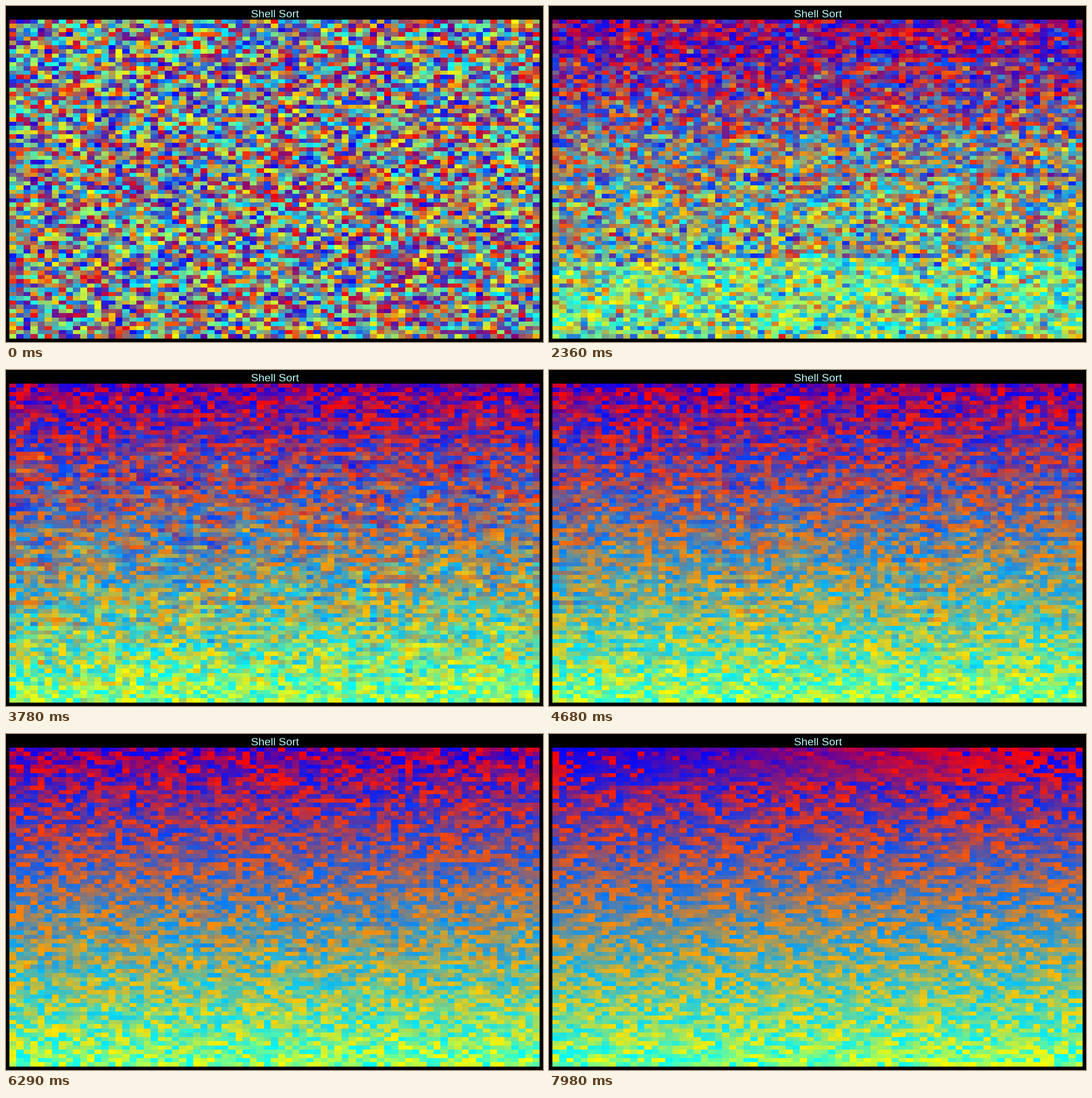
A matplotlib script that plays this animation: 947x592 px, repeating every 8000 ms.

```python
import numpy as np
import matplotlib.pyplot as plt
from matplotlib.animation import FuncAnimation

WIDTH, HEIGHT, DPI = 947, 592, 100
SIDE = 75
COUNT = SIDE * SIDE
LOOP_MS, INTERVAL = 8000, 20

FIRST_STEP, STEP_COUNT, STEP_MS = 1070, 144, 48.32
# Sorting pace: time in ms against grid rows inserted over all passes.
# Passes with smaller gaps move more cells and so take longer.
PACE_TIMES = [1022, 1730, 2070, 2700, 3545, 4590, 5680, 6775, 7855, 7985]
PACE_ROWS = [0, 56, 93.8, 159.4, 229.7, 302.4, 376.2, 450.6, 525.4, 534]


def shell_sort(values):
    """Sort in place, yielding after every insertion."""
    gap = len(values) // 2
    while gap:
        for i in range(gap, len(values)):
            value, j = values[i], i
            while j >= gap and values[j - gap] > value:
                values[j] = values[j - gap]
                j -= gap
            values[j] = value
            yield
        gap //= 2


def record_steps():
    values = np.random.default_rng(12).permutation(COUNT).tolist()
    snapshots = [np.array(values)]
    sorter = shell_sort(values)
    done = 0
    for step in range(STEP_COUNT):
        time = FIRST_STEP + step * STEP_MS
        goal = int(np.interp(time, PACE_TIMES, PACE_ROWS) * SIDE)
        for _ in range(goal - done):
            next(sorter)
        done = goal
        snapshots.append(np.array(values))
    return snapshots


def make_palette():
    """Blue to red across the top, cyan to yellow across the bottom."""
    row, col = np.divmod(np.arange(COUNT), SIDE)
    across, down = col / (SIDE - 1), row / (SIDE - 1)
    rgb = np.stack([across, down, 1 - across], axis=1)
    return np.round(rgb * 255).astype(np.uint8)


palette = make_palette()
snapshots = record_steps()


def grid_colors(step):
    return palette[snapshots[step]].reshape(SIDE, SIDE, 3)


fig = plt.figure(figsize=(WIDTH / DPI, HEIGHT / DPI), dpi=DPI, facecolor="black")
ax = fig.add_axes([0, 0, 1, 1])
image = ax.imshow(grid_colors(0), extent=(6, 941, 586, 24),
                  interpolation="nearest", aspect="auto")
ax.set_xlim(0, WIDTH)
ax.set_ylim(HEIGHT, 0)
ax.axis("off")
ax.text(474, 20, "Shell Sort", color="#b8f8f8", family="Liberation Sans",
        fontsize=19.5 * 72 / DPI, ha="center", va="baseline")


def update(frame):
    elapsed = frame * INTERVAL - FIRST_STEP
    step = int(np.clip(elapsed // STEP_MS + 1, 0, STEP_COUNT))
    image.set_data(grid_colors(step))
    return [image]


animation = FuncAnimation(fig, update, frames=LOOP_MS // INTERVAL,
                          interval=INTERVAL, repeat=True, repeat_delay=0)
plt.show()
```
